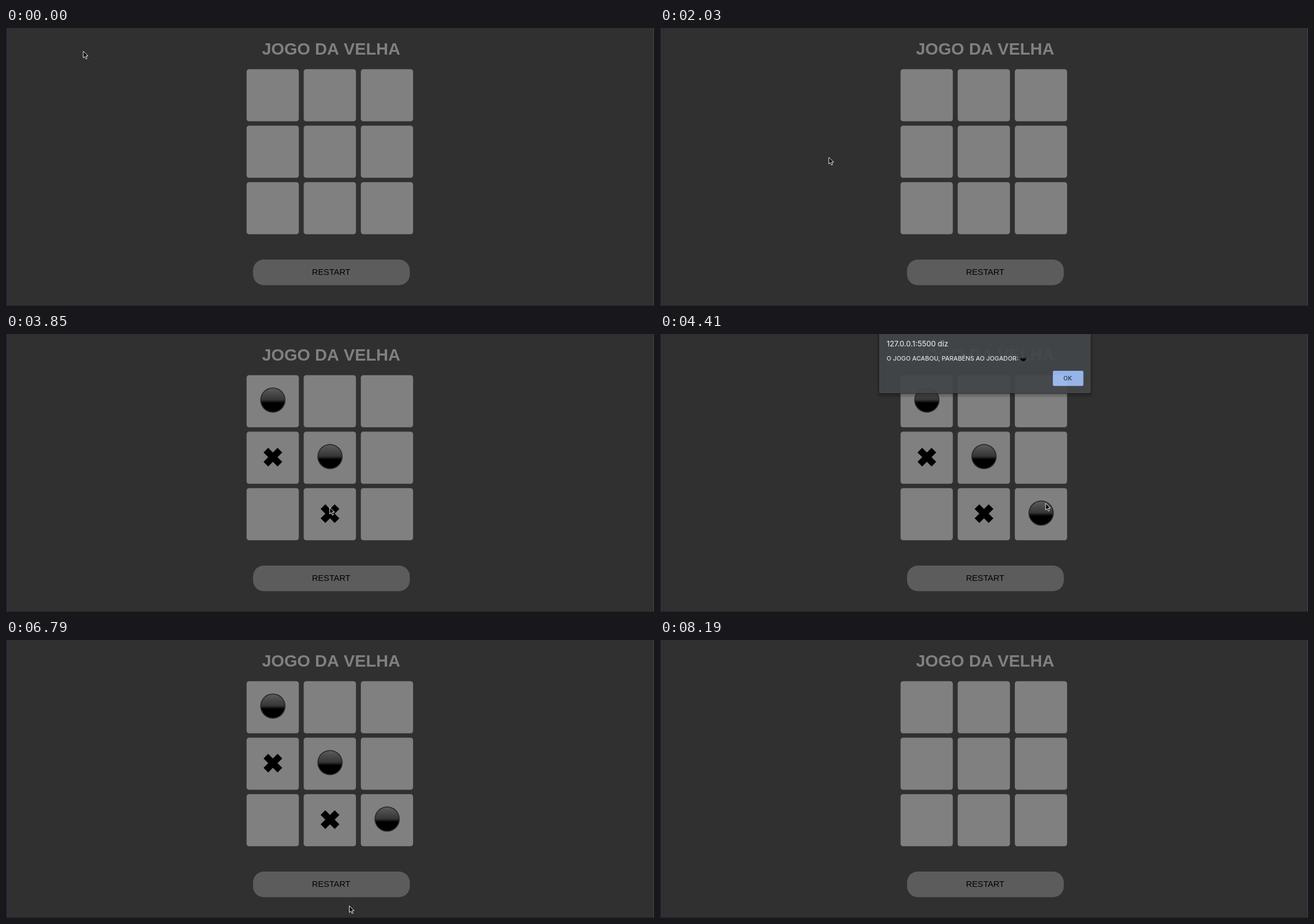
Animation of 1141x491 px, one loop 8.26 s. Source, as an HTML page:

```html
<!DOCTYPE html>
<html lang="pt">
<head>
<meta charset="utf-8">
<title>Jogo da velha</title>
<style>
  html, body { margin: 0; width: 100%; height: 100%; overflow: hidden; background: #303030; }
  svg { display: block; width: 100%; height: 100%; }
  text { white-space: pre; }
  .page { font-family: "Liberation Sans", Arial, sans-serif; text-anchor: middle; }
  .title { font-size: 29.45px; font-weight: 700; font-kerning: none; fill: #808080; }
  .label { font-size: 14.75px; fill: #000; }
  .dialog { font-family: Inter, Roboto, sans-serif; font-weight: 500; fill: #e8eaed; }
</style>
</head>
<body>
<svg id="stage" viewBox="0 0 1141 491">
  <defs>
    <linearGradient id="ball" x1="0" y1="0" x2="0" y2="1">
      <stop offset="0" stop-color="#5a5a5a"/>
      <stop offset=".48" stop-color="#363636"/>
      <stop offset=".56" stop-color="#181818"/>
      <stop offset=".62" stop-color="#000"/>
    </linearGradient>
    <filter id="soft" x="-10%" y="-10%" width="120%" height="120%">
      <feGaussianBlur stdDeviation="2"/>
    </filter>
    <g id="O">
      <circle r="22.3" fill="#2b2b2b"/>
      <circle r="20.6" fill="url(#ball)"/>
    </g>
    <g id="X">
      <rect x="-17.5" y="-5.8" width="35" height="11.6" transform="rotate(45)"/>
      <rect x="-17.5" y="-5.8" width="35" height="11.6" transform="rotate(-45)"/>
    </g>
  </defs>

  <rect width="1141" height="491" fill="#303030"/>
  <rect width="3" height="491" fill="#25252f"/>
  <rect x="3" width="1" height="491" fill="#48485e"/>
  <rect x="4" width="1" height="491" fill="#1f1f22"/>
  <rect x="1140" width="1" height="491" fill="#46464c"/>
  <rect y="490" width="1141" height="1" fill="#1f1f22"/>

  <g class="page" id="page">
    <g class="pop" data-x="572.5" data-y="36.5"><text class="title" x="572.5" y="47">JOGO DA VELHA</text></g>
    <g id="cells"></g>
    <g class="pop" data-x="572.8" data-y="431.7">
      <rect id="button" x="435" y="409" width="276" height="45.3" rx="19"/>
      <text class="label" x="572.6" y="436">RESTART</text>
    </g>
  </g>
  <g id="pieces"></g>

  <g class="dialog" id="dialog">
    <rect x="383" y="-10" width="378" height="122" fill="#000" opacity=".25" filter="url(#soft)"/>
    <rect x="384.5" y="-30" width="375.2" height="137" rx="2" fill="#434649" stroke="#161718"/>
    <rect x="385.5" y="-30" width="373.2" height="136" rx="1.5" fill="none" stroke="#55585b" stroke-width=".6"/>
    <text x="398.3" y="23.5" font-size="13">127.0.0.1:5500 diz</text>
    <text x="398.3" y="48.4" font-size="10.9">O JOGO ACABOU, PARABÉNS AO JOGADOR:</text>
    <use href="#O" transform="translate(640 44.5) scale(.25)"/>
    <rect id="okBox" x="692.3" y="67" width="54" height="26.8" rx="2.5"/>
    <text id="okText" x="718.6" y="83.6" font-size="10.3" font-weight="600" text-anchor="middle">OK</text>
  </g>

  <path id="cursor" d="M0 0V11.7L2.7 9.2 4.6 13.6 6.7 12.7 4.8 8.4H8.5Z" fill="#000" stroke="#fff" stroke-width=".95" stroke-linejoin="round"/>
</svg>

<script>
const LOOP = 8260, STEP = 70;
const RELOAD = 1260, OVER = 4200, CLOSE = 6090, RESTART = 7280;
const byId = id => document.getElementById(id);
const clamp = v => Math.max(0, Math.min(1, v));

function add(parent, tag, attrs) {
  const el = document.createElementNS("http://www.w3.org/2000/svg", tag);
  for (const k in attrs) el.setAttribute(k, attrs[k]);
  return parent.appendChild(el);
}

// Centre of a board cell, counted row by row
function centre(cell) {
  return { x: 469.6 + 100.6 * (cell % 3), y: 118.7 + 99.8 * Math.floor(cell / 3) };
}

for (let i = 0; i < 9; i++) {
  const { x, y } = centre(i);
  const g = add(byId("cells"), "g", { class: "pop", "data-x": x, "data-y": y });
  add(g, "rect", { x: x - 46, y: y - 46, width: 92, height: 92, rx: 4.5, fill: "#808080" });
}

const moves = [
  { at: 2660, cell: 0 }, { at: 2940, cell: 3 }, { at: 3220, cell: 4 },
  { at: 3780, cell: 7 }, { at: OVER, cell: 8 }
];
moves.forEach((move, i) => {
  const { x, y } = centre(move.cell);
  const href = i % 2 ? "#X" : "#O";
  move.el = add(byId("pieces"), "use", { href, x: x + .3, y: i % 2 ? y - 1 : y - 2 });
});

// The pointer visits the played cells, the OK button and the restart button
const aim = ({ at, cell }) => {
  const { x, y } = centre(cell);
  return [at, x - 17, y - 12];
};
const path = [
  [0, 136, 41], [140, 138, 35], [490, 75, -5], [RELOAD, 80, -12], [1890, 230, -30], [1960, 280, 242],
  ...moves.map(aim),
  [4410, 679, 299], [4620, 826, 339], [5250, 826, 339],
  [6020, 723.5, 72], [6370, 723.5, 72], [6580, 819, 250], [6790, 604.5, 469.5],
  [7210, 575, 440], [7560, 575, 440], [8190, 560, 520]
];

function pointer(t) {
  const i = path.findIndex(k => k[0] > t);
  if (i < 0) return path[path.length - 1].slice(1);
  const [t0, x0, y0] = path[i - 1], [t1, x1, y1] = path[i];
  const u = (t - t0) / (t1 - t0);
  return [x0 + (x1 - x0) * u, y0 + (y1 - y0) * u];
}

// CSS "ease": cubic-bezier(.25, .1, .25, 1)
function ease(x) {
  let lo = 0, hi = 1, s = x;
  for (let i = 0; i < 24; i++) {
    s = (lo + hi) / 2;
    const bx = .75 * s * (1 - s) + s * s * s;
    if (bx < x) lo = s; else hi = s;
  }
  return .3 * s * (1 - s) ** 2 + 3 * s * s * (1 - s) + s ** 3;
}

function dialogShown(t) {
  if (t <= CLOSE) return 1 - (1 - clamp((t - OVER) / 320)) ** 2;
  return clamp((CLOSE + 210 - t) / 210);
}

const pops = [...document.querySelectorAll(".pop")];

function draw(t) {
  // The reloaded page fades and grows in
  const p = t < RELOAD ? 1 : ease(clamp((t - RELOAD + 124) / 550));
  const s = .9 + .1 * p;
  byId("page").setAttribute("opacity", p);
  for (const el of pops) {
    const { x, y } = el.dataset;
    el.setAttribute("transform", `translate(${x} ${y}) scale(${s}) translate(${-x} ${-y})`);
  }

  for (const m of moves) m.el.style.display = t >= m.at && t < RESTART ? "" : "none";

  const d = dialogShown(t), k = .96 + .04 * d;
  const dialog = byId("dialog");
  dialog.style.display = d > 0 ? "" : "none";
  dialog.setAttribute("opacity", Math.sqrt(d));
  dialog.setAttribute("transform", `translate(${572.3 * (1 - k)} ${-14 * (1 - d)}) scale(${k})`);

  const [x, y] = pointer(t);
  byId("cursor").setAttribute("transform", `translate(${x} ${y})`);
  const overButton = x > 435 && x < 711 && y > 409 && y < 454;
  byId("button").setAttribute("fill", overButton ? "#6a6a6a" : "#5c5c5c");
  const overOk = t > OVER && x > 692 && x < 746 && y < 94;
  byId("okBox").setAttribute("fill", overOk ? "#94acdc" : "#9ebdf6");
  byId("okText").setAttribute("fill", overOk ? "#596a8c" : "#33435f");
}

const start = performance.now();
function tick() {
  const t = (performance.now() - start) % LOOP;
  draw(Math.floor(t / STEP) * STEP);
  requestAnimationFrame(tick);
}
tick();
</script>
</body>
</html>
```
